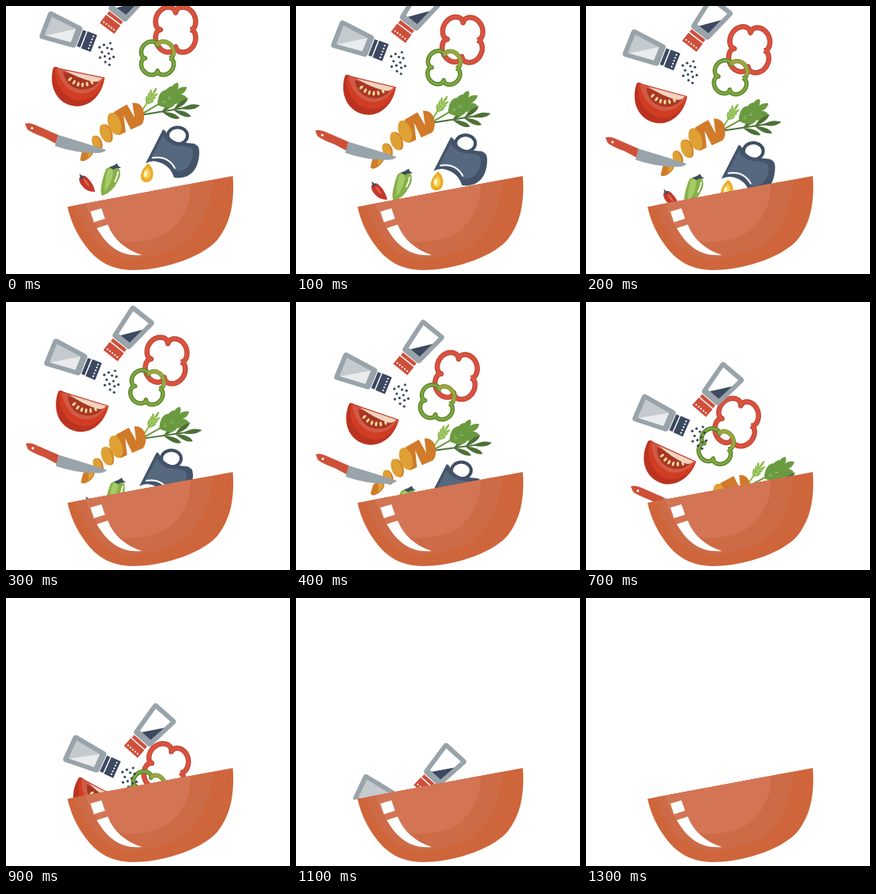
Recreate the animation shown at these times as an HTML page. Size 360 by 339 pixels, loop 1.4 s.

```html
<!DOCTYPE html>
<html lang="en">
<head>
<meta charset="utf-8">
<title>Salad bowl</title>
<style>
  html, body { margin: 0; width: 100%; height: 100%; overflow: hidden; background: #fff; }
  svg { display: block; width: 360px; height: 339px; }
  #items > g { transform-box: fill-box; transform-origin: center; }
</style>
</head>
<body>
<svg viewBox="0 0 360 339">
  <defs>
    <clipPath id="above"><path d="M0 0H360V202L288 215.500L78 254.500L0 269Z"/></clipPath>
    <clipPath id="bowlShape"><path id="bowlPath" d="M78 254L287.500 215C290 250 284 274 270 293C254 316 200 335 158 334C124 333 107 313 97 298C87 283 81 268 78 254Z"/></clipPath>
  </defs>

  <g clip-path="url(#above)">
    <g id="items">
      <g id="redBell"></g>
      <g id="greenBell"></g>
      <g id="saltShaker"></g>
      <g id="pepperShaker"></g>
      <g id="grains" fill="#3c4960"></g>

      <g id="tomato">
        <g transform="translate(92 87) rotate(8)">
          <path fill="#bb3320" d="M-33 -4Q-31 -7 -26 -5L33 -1C34 20 20 40 0 40C-22 40 -36 20 -33 -4Z"/>
          <path fill="#d03d22" d="M-31 -4L33 -1C33 17 20 32 3 32C-14 32 -29 16 -31 -4Z"/>
          <path fill="#d25a45" d="M-29 -4L32 -1C27 15 16 23 4 23C-9 23 -21 14 -29 -4Z"/>
          <path fill="#a83624" d="M-20 -1L27 4C22 14 13 18 4 18C-7 18 -16 11 -20 -1Z"/>
          <path fill="#f0d3c0" d="M-18 -3L30 0Q27 6 20 6Q2 5 -18 -3Z"/>
          <g id="seeds" fill="#f4d69b"></g>
        </g>
      </g>

      <g id="jug">
        <ellipse cx="217.500" cy="164" rx="12.500" ry="10.500" fill="none" stroke="#3f4e64" stroke-width="4"/>
        <path fill="#43536a" d="M199 156L177 199Q184 195 192 197Q208 201 213 217C233 220 245 207 245 184Q245 176 238 174L217 172Q207 169 202 158Z"/>
        <path fill="#56687e" d="M199 164L183 194Q206 190 214 208C228 211 236 200 237 186Q237 179 230 178L214 176Q204 173 199 164Z"/>
        <path fill="none" stroke="#fff" stroke-width="2" stroke-linecap="round" d="M186 192Q205 189 214 205"/>
      </g>
      <g id="drop">
        <path fill="#e9ac2c" d="M180 199C187 204 188 213 185 219C181 225 173 224 171 218C170 210 175 204 180 199Z"/>
        <path fill="#f6d055" d="M179 204C184 208 184 214 181 218C176 220 173 216 174 212Z"/>
        <ellipse cx="177" cy="212" rx="2" ry="4" fill="#fff3c9"/>
      </g>

      <g id="carrot">
        <g id="leaves"></g>
        <path fill="#d17a29" d="M137 134L154 124Q169 119 174 131Q177 144 172 150L144 163Z"/>
        <path fill="#fff" d="M153 124L160 121.500L163 141ZM149 138L159 158L152 161Z"/>
        <g id="slices"></g>
        <path fill="#cf7d2b" d="M97 183Q104 176 110 179Q113 185 107 191Q98 199 94 195Q95 188 97 183Z"/>
        <path fill="#dfa034" d="M103 180Q110 176 110 181Q109 189 104 192Z"/>
      </g>

      <g id="knife">
        <path fill="#98a3aa" d="M66 163L102 174L127 182Q124 186 115 186Q88 186 62 177Z"/>
        <path fill="#ce5039" d="M24 149Q29 147 36 150L66 163L63 174L48 166Q34 161 27 156Z"/>
        <circle cx="33" cy="154.500" r="1.600" fill="#fff"/>
      </g>

      <g id="chiliRed">
        <path fill="#c4392b" d="M93 217Q98 212 103 217Q111 225 113 235Q103 236 96 227Q92 222 93 217Z"/>
        <path fill="#dd6a55" d="M98 218Q104 222 106 229Q99 224 98 218Z"/>
        <path fill="#3d4c60" d="M93 212L97 215L101 215L95 219Z"/>
      </g>
      <g id="chiliGreen">
        <path fill="#86b048" d="M127 206Q135 200 143 205Q147 213 142 221Q135 236 122 240Q119 236 121 226Q124 212 127 206Z"/>
        <path fill="#a5ca68" d="M129 207Q135 204 136 210Q134 226 125 234Q125 219 129 207Z"/>
        <path fill="none" stroke="#fff" stroke-width="1.800" stroke-linecap="round" d="M142 210Q141 217 138 222"/>
        <path fill="#3d4c60" d="M131 204L136 202L141 199L142 202L146 205L140 205L136 207Z"/>
      </g>
    </g>
  </g>

  <use href="#bowlPath" fill="#cf653a"/>
  <g clip-path="url(#bowlShape)">
    <path fill="#cd6b46" d="M87 250L262 216C262 250 252 276 231 296C212 312 186 319 160 320C123 321 98 285 87 250Z"/>
    <path fill="#d37554" d="M100 247L234 222C235 250 224 274 202 288C187 297 165 299 147 298C119 292 106 274 100 247Z"/>
  </g>
  <path fill="#fff" d="M107 260L121 256L125.500 269L111.500 273.500ZM115 281L129 276.500C136 295 151 308 172 315C148 317 130 307 115 281Z"/>
</svg>

<script>
const $ = id => document.getElementById(id);
const put = (id, markup) => { $(id).innerHTML = markup; };
const repeat = (n, make) => Array.from({ length: n }, (_, i) => make(i)).join("");
const deg = Math.PI / 180;

// Clover outline with four round lobes, or part of it between two angles.
function clover(cx, cy, rx, ry, from = 0, to = 360) {
  let d = "";
  for (let a = from; a <= to; a += 3) {
    const r = 0.66 + 0.34 * Math.sqrt(Math.abs(Math.sin(2 * a * deg)));
    const x = cx + rx * r * Math.cos(a * deg);
    const y = cy + ry * r * Math.sin(a * deg);
    d += (d ? "L" : "M") + x.toFixed(1) + " " + y.toFixed(1);
  }
  return d;
}
const stroke = (d, color, w) =>
  `<path d="${d}" fill="none" stroke="${color}" stroke-width="${w}" stroke-linejoin="round"/>`;

const redRing = clover(215, 30, 29, 32.5);
put("redBell", stroke(redRing, "#bd4030", 6.5) + stroke(redRing, "#d8533f", 4.5));
const greenRing = clover(192, 66, 23.5, 24);
put("greenBell", stroke(greenRing, "#5b852c", 5.5) + stroke(greenRing, "#82ab42", 2.5) +
  stroke(clover(192, 66, 23.5, 24, -90, -9), "#9ca53f", 4.5));

// Shaker lies along x, from its base at 0 to the cap at 68.
function shaker(x, y, turn, cap, glass, fill, level) {
  const holes = repeat(5, i => `<circle cx="64" cy="${i * 4 - 8}" r="1.1" fill="#fff"/>`);
  return `<g transform="translate(${x} ${y}) rotate(${turn})">
    <path d="M4 -14.500L44 -10.500V10.500L4 14.500Z" fill="#98a3aa" stroke="#98a3aa" stroke-width="8" stroke-linejoin="round"/>
    <path d="M6 -12.500L40 -9V9L6 12.500Z" fill="${glass}"/>
    <path d="${level}" fill="${fill}"/>
    <path d="M49 -11H53.500V11H49ZM55 -11.500H68V11.500H55Z" fill="${cap}"/>${holes}</g>`;
}
put("saltShaker", shaker(48, 23, 21, "#3c4960", "#c4cace", "#e9ebed", "M7 12.500L40 -9V9Z"));
put("pepperShaker", shaker(169, -26, 127, "#cf4f3b", "#fff", "#3c4960", "M17 -11.500L40 -9V6Z"));

put("grains", repeat(13, i => {
  const r = Math.sqrt((i + 0.5) / 13), a = i * 2.4;
  return `<circle cx="${128 + 11 * r * Math.cos(a)}" cy="${60 + 16 * r * Math.sin(a)}" r="1.6"/>`;
}));

put("seeds", repeat(6, i => {
  const u = i / 2.5 - 1;
  return `<ellipse rx="1.6" ry="3" transform="translate(${4 + 14 * u} ${12 - 5 * u * u}) rotate(${-35 * u})"/>`;
}));

// Slices grow from the thin end towards the body.
put("slices", repeat(3, i => {
  const x = 114.5 + 11.5 * i, y = 173 - 12 * i, ry = 9.5 + 2.5 * i;
  const disc = (dx, color) =>
    `<ellipse rx="${ry * 0.55}" ry="${ry}" transform="translate(${x + dx} ${y}) rotate(-20)" fill="${color}"/>`;
  return disc(2, "#d07c29") + disc(0, "#dfa034");
}));

// Feathered leaf: a stem with slanted blades on both sides and one at the tip.
function leaf(x0, y0, x1, y1, pairs, len, wide, color) {
  const L = Math.hypot(x1 - x0, y1 - y0);
  const blade = (x, turn) => `<path transform="translate(${x} 0) rotate(${turn})"
    d="M0 0Q${len * 0.7} ${-wide} ${len} 0Q${len * 0.7} ${wide} 0 0Z"/>`;
  const sides = repeat(pairs, i => {
    const x = L * (0.35 + 0.4 * i / pairs);
    return blade(x, 30) + blade(x, -30);
  });
  return `<g fill="${color}" transform="translate(${x0} ${y0}) rotate(${Math.atan2(y1 - y0, x1 - x0) / deg})">
    <path d="M0 -1.200H${L}V.8H0Z"/>${sides}${blade(L - len, 0)}</g>`;
}
put("leaves",
  leaf(171, 135, 191, 104, 3, 11, 3, "#8ebc50") +
  leaf(172, 138, 245, 126, 2, 24, 6, "#4b7136") +
  leaf(172, 137, 229, 103, 3, 22, 8, "#6a9a3f"));

// Every part follows one shared fall, scaled; it drifts early, then late, and may sway.
const parts = {
  saltShaker:   { fall: 1,    early: 6,   late: 24, spin: 0.4 },
  pepperShaker: { fall: 1,    early: 5,   late: 27, spin: 0.5 },
  grains:       { fall: 1,    early: 6,   late: 23 },
  tomato:       { fall: 0.93, early: 4,   late: 20, spin: 1.8 },
  redBell:      { fall: 1.1,  early: -12, sway: -12, spin: 2 },
  greenBell:    { fall: 1.05, early: -13, sway: -14, spin: 2 },
  carrot:       { fall: 0.87, early: 2,   late: 71, spin: 0.4 },
  knife:        { fall: 0.76, early: 1,   late: 73 },
  jug:          { fall: 0.85, early: -8 },
  drop:         { fall: 0.9 },
  chiliRed:     { fall: 0.85, early: 8 },
  chiliGreen:   { fall: 0.58, early: 6 }
};

const drop = [[0, 0], [200, 23], [300, 40], [700, 111], [900, 168], [1200, 243]];
function fallen(t) {
  const i = Math.max(1, drop.findIndex(k => k[0] >= t));
  const [t0, y0] = drop[i - 1], [t1, y1] = drop[i];
  return y0 + (y1 - y0) * (t - t0) / (t1 - t0);
}
const ramp = (t, from, to) => Math.min(1, Math.max(0, (t - from) / (to - from)));

function place(id, t) {
  const { fall, early = 0, late = 0, sway = 0, spin = 0 } = parts[id];
  const p = ramp(t, 500, 900);
  const x = early * ramp(t, 0, 300) + late * p ** 1.2 + sway * Math.sin(Math.PI * p);
  $(id).style.transform = `translate(${x}px, ${fall * fallen(t)}px) rotate(${spin * t / STEP}deg)`;
}

const LOOP = 1400, STEP = 100, LAST = 1200;
const start = performance.now();

function draw() {
  const t = Math.floor(((performance.now() - start) % LOOP) / STEP) * STEP;
  $("items").style.display = t <= LAST ? "" : "none";
  for (const id in parts) place(id, Math.min(t, LAST));
  requestAnimationFrame(draw);
}
draw();
</script>
</body>
</html>
```
